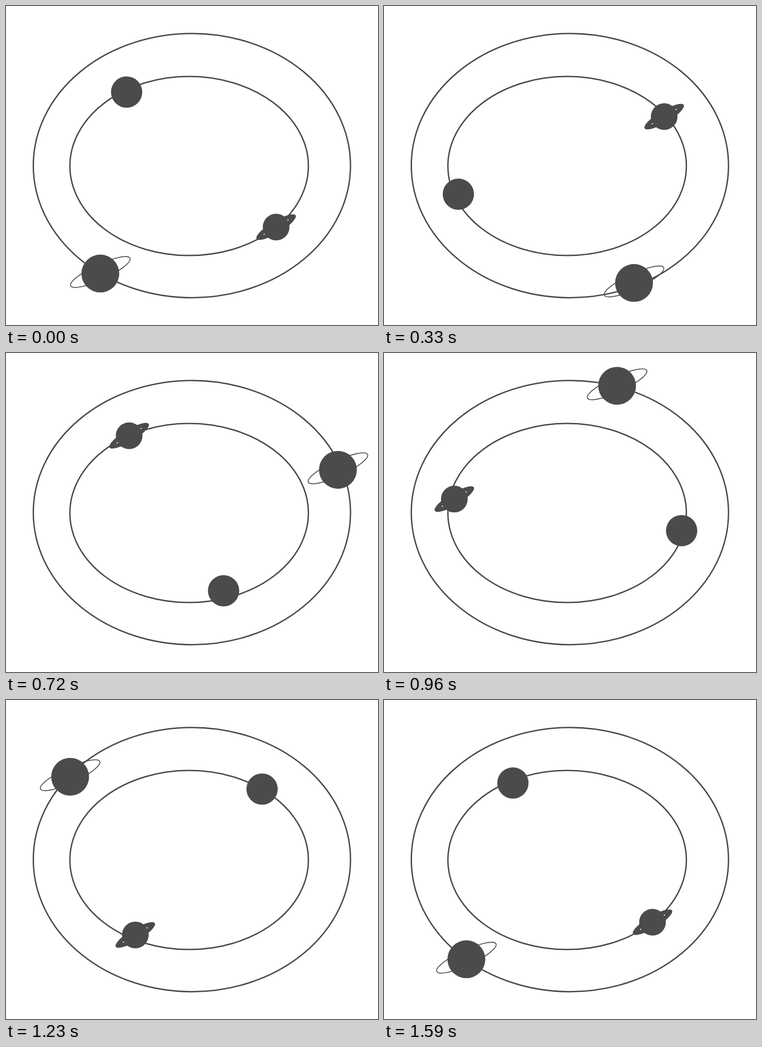
Animation, 808 px wide and 693 px high, one loop 1.62 s. Source, as an HTML page:

```html
<!DOCTYPE html>
<html lang="en">
<head>
<meta charset="utf-8">
<title>Orbits</title>
<style>
  html, body { margin: 0; width: 100%; height: 100%; overflow: hidden; background: #fff; }
  svg { display: block; width: 808px; height: 693px; }
  .line { fill: none; stroke: #4b4b4b; }
  .solid { fill: #4b4b4b; }
  .hole { fill: #fff; }
</style>
</head>
<body>
<svg viewBox="0 0 808 693">
  <ellipse class="line" stroke-width="3" cx="403.8" cy="346.7" rx="344.5" ry="287"/>
  <ellipse class="line" stroke-width="3" cx="397.8" cy="347.6" rx="259" ry="194.5"/>
  <g id="moon">
    <circle class="solid" r="34"/>
  </g>
  <g id="ringed">
    <g transform="rotate(-31)">
      <ellipse class="solid" rx="49.5" ry="13"/>
      <ellipse class="hole" rx="32" ry="3"/>
    </g>
    <circle class="solid" r="29"/>
  </g>
  <g id="giant">
    <ellipse class="line" stroke-width="1.9" rx="71" ry="16.5" transform="translate(0 -3.3) rotate(-25)"/>
    <circle class="solid" r="41.1"/>
  </g>
</svg>
<script>
const LOOP = 1620, STEP = 30;
const outer = { cx: 403.8, cy: 346.8, rx: 344.5, ry: 287 };
const inner = { cx: 397.8, cy: 347.8, rx: 259, ry: 194.5 };

// A planet passes its waypoints counter-clockwise at equal intervals.
const planets = [
  planet("moon", inner, [262, 187], [147, 357], [312, 520], [533, 494], [652, 298.5], [479, 165.5], [280, 180.3]),
  planet("ringed", inner, [586.7, 480.3], [637, 286], [442.5, 153], [213.6, 214], [159.6, 391], [383.6, 534], [583.2, 482.7]),
  planet("giant", outer, [204.9, 581.2], [461.8, 624], [722.8, 426], [683.3, 187.8], [358.5, 58.7], [77.5, 273.2], [178.9, 563.2])
];

function planet(id, orbit, ...points) {
  const angles = [], radii = [];
  for (const [x, y] of points) {
    const u = (x - orbit.cx) / orbit.rx, v = (orbit.cy - y) / orbit.ry;
    let angle = Math.atan2(v, u);
    while (angle < angles.at(-1)) angle += 2 * Math.PI;
    angles.push(angle);
    radii.push(Math.hypot(u, v));
  }
  return { node: document.getElementById(id), orbit, angles, radii };
}

// Catmull-Rom curve through evenly spaced values, p from 0 to 1
function spline(k, p) {
  const n = k.length - 1;
  const i = Math.min(Math.floor(p * n), n - 1), u = p * n - i;
  const b = k[i], c = k[i + 1];
  const a = i > 0 ? k[i - 1] : 3 * (b - c) + k[i + 2];
  const d = i < n - 1 ? k[i + 2] : 3 * (c - b) + a;
  return b + u / 2 * (c - a + u * (2 * a - 5 * b + 4 * c - d + u * (3 * (b - c) + d - a)));
}

function draw(ms) {
  const p = Math.floor((ms % LOOP) / STEP) * STEP / (LOOP - STEP);
  for (const { node, orbit, angles, radii } of planets) {
    const angle = spline(angles, p), r = spline(radii, p);
    const x = orbit.cx + orbit.rx * r * Math.cos(angle);
    const y = orbit.cy - orbit.ry * r * Math.sin(angle);
    node.setAttribute("transform", `translate(${x.toFixed(2)} ${y.toFixed(2)})`);
  }
}

const start = performance.now();
function tick(now) {
  draw(Math.max(0, now - start) + 1);
  requestAnimationFrame(tick);
}
draw(0);
requestAnimationFrame(tick);
</script>
</body>
</html>
```
